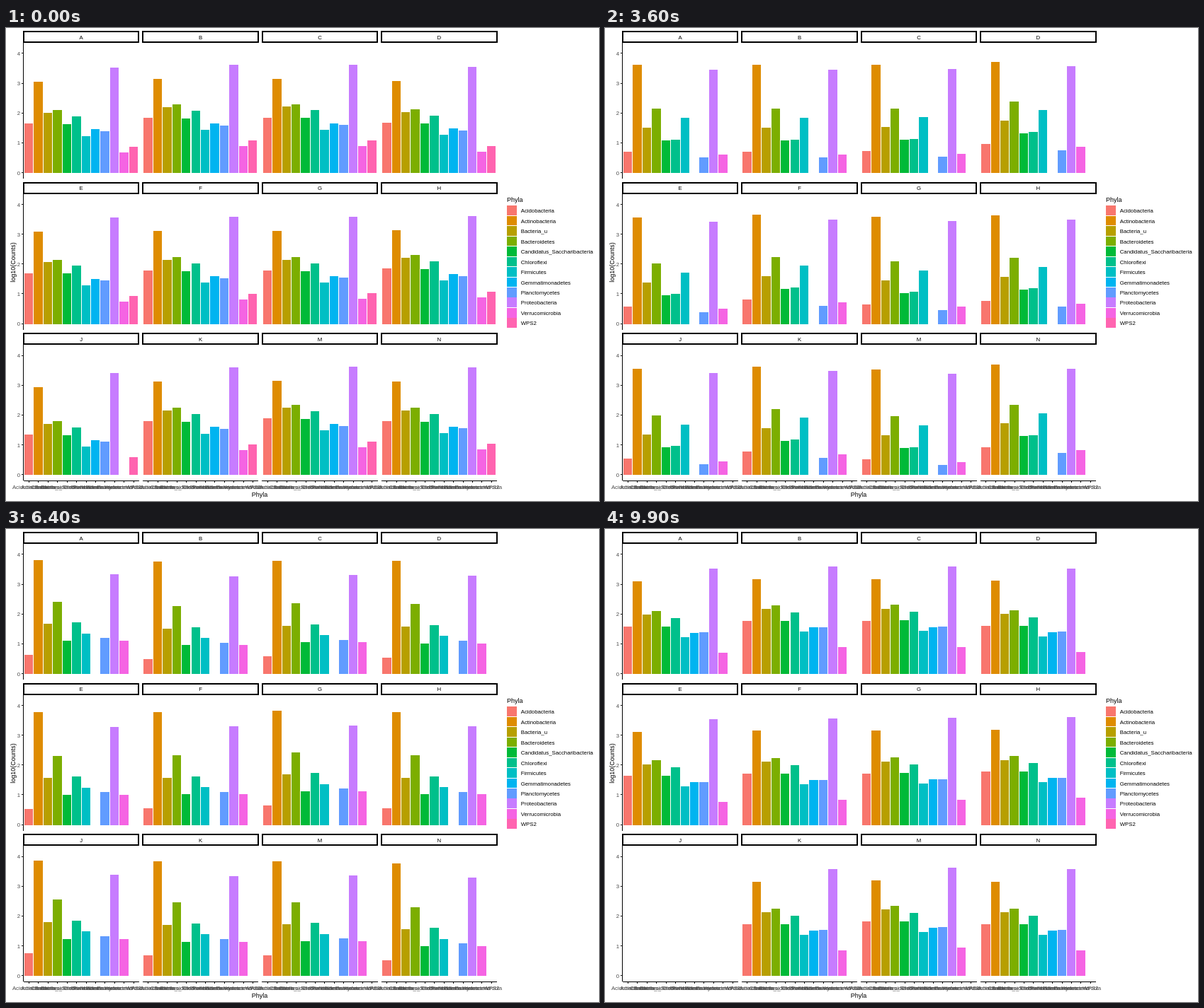
Recreate the animation shown at these times as an HTML page. Size 837 by 669 pixels, loop 10000 ms.

```html
<!DOCTYPE html>
<html lang="en">
<head>
<meta charset="utf-8">
<title>Phyla counts</title>
<style>
html, body { margin: 0; width: 100%; height: 100%; overflow: hidden; background: #fff; }
svg { display: block; width: 837px; height: 669px; font: 7.8px "Liberation Sans", Arial, sans-serif; }
.title { font-size: 9px; }
.mid { text-anchor: middle; }
.end { text-anchor: end; }
.axis { fill: #4d4d4d; }
.line { stroke: #000; }
.strip { fill: #fff; stroke: #000; stroke-width: 2; }
rect, line { shape-rendering: crispEdges; }
</style>
</head>
<body>
<svg id="stage" viewBox="0 0 837 669"></svg>
<script>
const LOOP = 10000, STEP = 100, SEG = LOOP / 6;
const UNIT = 42.15, PITCH = 13.42, BAR = 12.4;
const COL = 168.4, ROW = 213.6, LEFT = 24.5, WIDTH = 163.3, BASE = 205;
const none = NaN;

// Name, colour, typical log10 count (in hundredths) at the six turning points
const phyla = [
  ['Acidobacteria', '#F8766D', [176, 123, 75, 62, 60, 60]],
  ['Actinobacteria', '#DE8C00', [311, 348, 361, 372, 383, 383]],
  ['Bacteria_u', '#B79F00', [212, 164, 152, 158, 165, 165]],
  ['Bacteroidetes', '#7CAE00', [221, 166, 212, 241, 239, 239]],
  ['Candidatus_Saccharibacteria', '#00BA38', [174, 121, 110, 111, 107, 107]],
  ['Chloroflexi', '#00C08B', [200, 137, 110, 136, 175, 175]],
  ['Firmicutes', '#00BFC4', [135, 283, 194, 150, 129, 129]],
  ['Gemmatimonadetes', '#00B4F0', [157, 89, 3, none, none, 10]],
  ['Planctomycetes', '#619CFF', [151, 93, 50, 73, 125, 125]],
  ['Proteobacteria', '#C77CFF', [359, 337, 347, 352, 329, 329]],
  ['Verrucomicrobia', '#F564E3', [80, 28, 50, 136, 102, 102]],
  ['WPS2', '#FF64B0', [99, 45, none, none, none, none]]
];

// Each panel's overall shift: at the start, in the middle and late in the loop
const panels = [
  { name: 'A', start: -11, mid: -4, late: 9 },
  { name: 'B', start: 9, mid: 3, late: -27 },
  { name: 'C', start: 10, mid: 1, late: -4 },
  { name: 'D', start: -8, mid: 30, late: -12 },
  { name: 'E', start: -5, mid: -13, late: -17 },
  { name: 'F', start: 3, mid: 12, late: -12 },
  { name: 'G', start: 4, mid: -10, late: 12 },
  { name: 'H', start: 10, mid: 8, late: -12 },
  { name: 'J', start: -40, mid: -28, late: 40, leaves: true },
  { name: 'K', start: 4, mid: 2, late: 19 },
  { name: 'M', start: 14, mid: -28, late: 22 },
  { name: 'N', start: 5, mid: 27, late: -19 }
];

const stage = document.getElementById('stage');
const bars = [];

function add(tag, attrs, text) {
  const el = document.createElementNS('http://www.w3.org/2000/svg', tag);
  for (const k in attrs) el.setAttribute(k, attrs[k]);
  if (text !== undefined) el.textContent = text;
  return stage.appendChild(el);
}
const label = (x, y, text, cls = '') => add('text', { x, y, class: cls }, text);
const line = (x1, y1, x2, y2) => add('line', { x1, y1, x2, y2, class: 'line' });
const lerp = (a, b, p) => a + (b - a) * p;

// Abundant phyla vary less between panels on the log scale
function turns(levels, { start, mid, late }) {
  const shifts = [start, (start + mid) / 2, mid, late, 0.3 * late, 0.3 * late];
  return levels.map((v, i) => v + shifts[i] * (v > 300 ? 0.4 : 1));
}

panels.forEach((panel, n) => {
  const row = Math.floor(n / 4), x = LEFT + COL * (n % 4), y = ROW * row;
  add('rect', { x: x + 0.5, y: y + 5, width: WIDTH - 1, height: 15, class: 'strip' });
  label(x + WIDTH / 2, y + 15.6, panel.name, 'mid');
  phyla.forEach(([name, fill, levels], i) => {
    const el = add('rect', { x: x + 1.5 + PITCH * i, width: BAR, fill });
    bars.push({ el, base: BASE + y, turn: turns(levels, panel), leaves: panel.leaves });
    if (row === 2) {
      const cx = x + PITCH * (i + 0.6);
      line(cx, 640, cx, 643);
      label(cx, 651.8, name, 'mid axis');
    }
  });
  if (row === 2) line(x, 640, x + WIDTH, 640);
});

for (let r = 0; r < 3; r++) {
  const top = ROW * r;
  line(LEFT, top + 20, LEFT, top + 213);
  for (let n = 0; n < 5; n++) {
    const y = top + BASE - 0.5 - n * UNIT;
    line(21.5, y, LEFT, y);
    label(20, y + 3, n, 'end axis');
  }
}
label(358, 663, 'Phyla', 'title mid');
add('text', { transform: 'translate(13 331.5) rotate(-90)', class: 'title mid' }, 'log10(Counts)');
label(707, 245.5, 'Phyla', 'title');
phyla.forEach(([name, fill], i) => {
  const y = 251.4 + 14.45 * i;
  add('rect', { x: 707, y, width: 13.6, height: 13.6, fill });
  label(726.7, y + 10, name);
});

// A bar shows only while it exists at both ends of the current stretch
function valueAt({ turn, leaves }, t) {
  const i = Math.floor(t / SEG), a = turn[i], b = turn[(i + 1) % 6];
  if (leaves && i === 5) return 0;
  return a > 0 && b > 0 ? lerp(a, b, t / SEG - i) : 0;
}

function draw(now) {
  const t = Math.floor((now % LOOP) / STEP) * STEP;
  for (const bar of bars) {
    const h = valueAt(bar, t) / 100 * UNIT;
    bar.el.setAttribute('y', bar.base - h);
    bar.el.setAttribute('height', h);
  }
}

const begin = performance.now();
function tick() {
  draw(performance.now() - begin);
  requestAnimationFrame(tick);
}
tick();
</script>
</body>
</html>
```
